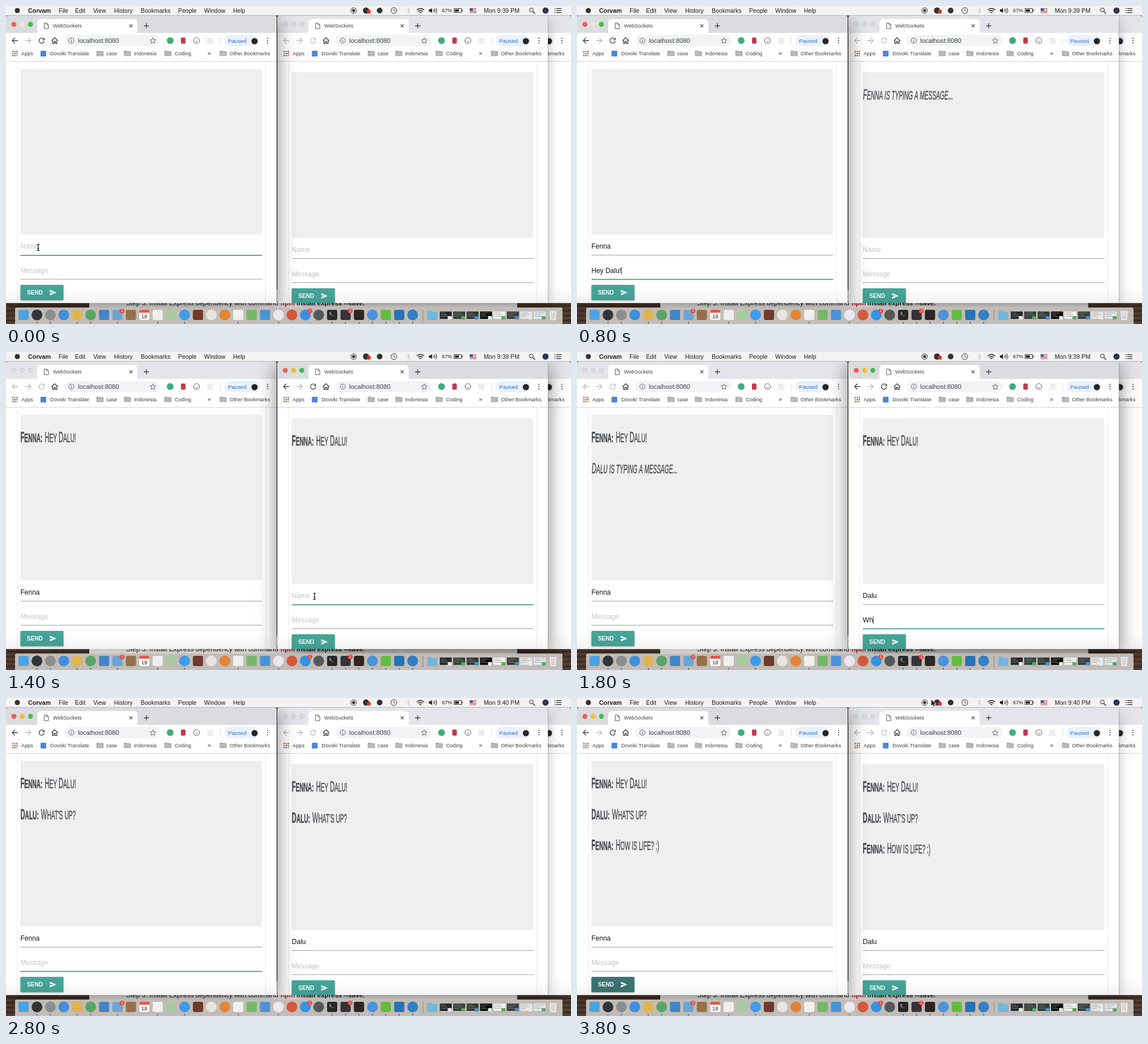
Write an HTML page with a canvas that moves like this. It is 998 px wide and 561 px high and loops after 4 s.

```html
<!DOCTYPE html>
<html lang="en">
<head>
<meta charset="utf-8">
<title>WebSockets chat</title>
<style>
html, body { margin: 0; width: 100%; height: 100%; overflow: hidden; background: #fff; }
canvas { display: block; }
</style>
</head>
<body>
<canvas id="stage" width="998" height="561"></canvas>
<script>
const ctx = document.getElementById('stage').getContext('2d');
const FONT = '"Liberation Sans", Arial, sans-serif';
const INK = '#3c4043', TEAL = '#45a598';
const STEP = 200, STEPS = 20;

const ICON = {
  back: 'M5 0H-5M0-5L-5 0L0 5',
  forward: 'M-5 0H5M0-5L5 0L0 5',
  reload: 'M3.4-3.2A4.6 4.6 0 1 0 4.6 1M4.6-5V-1.4H1',
  home: 'M-5.5 .3L0-5L5.5 .3M-3.8-1V5H-1.2V1.5H1.2V5H3.8V-1',
  star: 'M0-5L1.5-1.6L5-1.2L2.4 1.2L3.1 4.8L0 3L-3.1 4.8L-2.4 1.2L-5-1.2L-1.5-1.6Z',
  folder: 'M-5.5-4H-1L0-2.8H5.5V4.2H-5.5ZM-5.5-1H5.5',
  doc: 'M-3.5-5H1L4-2V5H-3.5ZM1-5V-2H4',
  close: 'M-2.6-2.6L2.6 2.6M2.6-2.6L-2.6 2.6',
  plus: 'M-4.5 0H4.5M0-4.5V4.5',
  send: 'M-5.5-5L6 0L-5.5 5V1.2L2 0L-5.5-1.2Z',
  arrow: 'M0 0V10.5L2.4 8.2L4 12L5.8 11.2L4.2 7.5H7.5Z',
  hand: 'M-2-6Q-.5-7.5 1-6V-1L5 0Q6 .5 6 2L5 6H-1L-5 1Q-4-.5-2 1Z',
  beam: 'M-2.5-5.5Q0-5.5 0-4V4Q0 5.5-2.5 5.5M2.5-5.5Q0-5.5 0-4M0 4Q0 5.5 2.5 5.5M-1.5 1.5H1.5'
};

// Chat script
const LOG = [['Fenna:', 'Hey Dalu!', 5], ['Dalu:', "What's up?", 12], ['Fenna:', 'How is life? :)', 18]];
const DRAFT = { 3: 'He', 4: 'Hey Dalu!', 9: 'Wh', 10: "What's", 11: "What's up?",
  15: 'How', 16: 'How is', 17: 'How is life? :)' };
const FOCUS = [[0, 'Lname'], [2, 'Lmsg'], [5, 'Lbtn'], [7, 'Rname'], [9, 'Rmsg'], [12, 'Rbtn'], [14, 'Lmsg'], [18, 'Lbtn']];
const POINTER = { 0: ['beam', 57, 426], 2: ['beam', 61, 463], 5: ['hand', 72, 508], 6: ['arrow', 537, 454],
  7: ['beam', 545, 431], 12: ['hand', 546, 513], 13: ['arrow', 94, 431], 18: ['hand', 72, 508], 19: ['arrow', 626, 3] };

function rect(x, y, w, h, color, r = 0) {
  ctx.fillStyle = color;
  ctx.beginPath();
  ctx.roundRect(x, y, w, h, r);
  ctx.fill();
}

function dot(x, y, r, color, ring) {
  ctx.beginPath();
  ctx.arc(x, y, r, 0, 7);
  if (color) { ctx.fillStyle = color; ctx.fill(); }
  if (ring) { ctx.strokeStyle = ring; ctx.lineWidth = 1; ctx.stroke(); }
}

function text(s, x, y, size, color = INK, style = '') {
  ctx.font = `${style} ${size}px ${FONT}`;
  ctx.fillStyle = color;
  ctx.fillText(s, x, y);
  return ctx.measureText(s).width;
}

function path(d, x, y, stroke, fill, width = 1.3) {
  const p = new Path2D(d);
  ctx.save();
  ctx.translate(x, y);
  if (stroke) { ctx.strokeStyle = stroke; ctx.lineWidth = width; ctx.stroke(p); }
  if (fill) { ctx.fillStyle = fill; ctx.fill(p); }
  ctx.restore();
}

function shadow(alpha, blur, dy) {
  ctx.shadowColor = `rgba(0,0,0,${alpha})`;
  ctx.shadowBlur = blur;
  ctx.shadowOffsetY = dy;
}

// Narrow hand-lettered capitals; returns the x where the text ends
function lettering(s, x, y, style) {
  const squeeze = 0.45;
  ctx.save();
  ctx.translate(x, y);
  ctx.scale(squeeze, 1);
  ctx.strokeStyle = '#474c4f';
  ctx.lineWidth = 0.5;
  let end = 0;
  for (const run of s.match(/[A-Z]|[^A-Z]+/g)) {
    const caps = run.toUpperCase();
    const w = text(caps, end, 0, /[A-Z]/.test(run) ? 25 : 22.5, '#474c4f', style);
    ctx.strokeText(caps, end, 0);
    end += w;
  }
  ctx.restore();
  return x + end * squeeze;
}

function toolbar(active) {
  const nav = active ? INK : '#b9bbbf';
  path(ICON.back, 16, 61, nav);
  path(ICON.forward, 39, 61, '#b9bbbf');
  path(ICON.reload, 63, 61, nav);
  path(ICON.home, 86, 61, INK);
  rect(103, 51, 169, 20, '#f1f3f4', 10);
  dot(115.5, 61, 4.6, null, '#5f6368');
  rect(115, 60, 1, 4, '#5f6368');
  rect(115, 58, 1, 1, '#5f6368');
  text('localhost:8080', 127, 64.5, 11.3);
  path(ICON.star, 259.5, 61, '#5f6368', null, 1);
  dot(290, 61, 6, '#3fae78');
  rect(309, 55.5, 8, 11, '#c23a50', 2);
  dot(336.5, 61, 5.2, null, '#55595d');
  path('M-2.2 1Q0 4 2.2 1', 336.5, 61, '#55595d', null, 1);
  rect(355, 56, 11, 11, '#eeeeef');
  rect(378, 55, 1, 12, '#dadce0');
  rect(386, 51, 61, 20, '#eaf1fd', 10);
  text('Paused', 392, 64.5, 9.7, '#2b6fc9');
  dot(439, 62, 5.5, '#292523');
  for (const y of [57, 61, 65]) dot(462, y, 1.1, INK);
}

function bookmarks() {
  const hues = ['#d9534a', '#e28a3c', '#4c8b5c'];
  for (let i = 0; i < 9; i++) rect(11 + i % 3 * 3.6, 79 + (i / 3 | 0) * 3.6, 2.4, 2.4, hues[(i + (i / 3 | 0)) % 3]);
  rect(61, 79, 10, 10, '#4a86dd', 1);
  for (const x of [166, 214.5, 286, 383.5]) path(ICON.folder, x, 83.5, '#62666a', '#b8bbbe', 1);
  const labels = [['Apps', 27], ['Dovoki Translate', 78], ['case', 177], ['Indonesia', 226], ['Coding', 298], ['Other Bookmarks', 395]];
  for (const [s, x] of labels) text(s, x, 87, 9.2);
  text('»', 356, 87, 11);
}

function field(label, value, y, focused, color, caret) {
  const w = text(value || label, 25.5, y, 12, value ? '#111' : '#c4c4c4');
  rect(25.5, y + 11, 427, focused ? 1.7 : 1, focused ? color : '#9b9ea0');
  if (caret) rect(25.5 + (value ? w : 0), y - 10, 1, 13, '#222');
}

function page(side, n, focus) {
  const left = side === 'L';
  rect(19.5, 98, 1, 426, '#e9e9e9');
  rect(458, 98, 1, 426, '#e9e9e9');
  ctx.translate(0, left ? 0 : 6);
  rect(25.5, 111, 426.5, 292, '#efefef');

  const sent = LOG.filter(m => n >= m[2]);
  const lineY = i => 159 + i * 54.7;
  sent.forEach(([who, words], i) => {
    const end = lettering(who, 25.5, lineY(i), 'bold');
    lettering(words, end + 4, lineY(i), '');
  });
  const draft = DRAFT[n];
  if (draft && focus[0] !== side)
    lettering(`${left ? 'Dalu' : 'Fenna'} is typing a message...`, 26, lineY(sent.length), 'italic');

  const onName = focus === side + 'name', onMsg = focus === side + 'msg';
  const name = n >= (left ? 1 : 8) ? (left ? 'Fenna' : 'Dalu') : '';
  const mine = onMsg && draft || '';
  field('Name', name, 428, onName, '#559a76', onName && name);
  field('Message', mine, 470.5, onMsg, n === 2 ? '#7d9693' : '#459a92', mine || onMsg && n === 2);

  ctx.save();
  shadow(0.3, 3, 1);
  rect(25.5, 492, 76, 27, focus === side + 'btn' ? '#3a7573' : TEAL, 1.5);
  ctx.restore();
  text('SEND', 37, 509, 10.1, '#fff', 'bold');
  path(ICON.send, 83, 505.5, null, '#fff');
}

function browser(dx, active, side, n, focus) {
  ctx.save();
  ctx.translate(dx, 0);
  ctx.save();
  shadow(active ? 0.5 : 0.25, active ? 34 : 22, 6);
  rect(0, 17, 478, 507, '#fff', [4, 4, 0, 0]);
  ctx.restore();
  rect(0, 17, 478, 30.5, active ? '#dadce0' : '#e4e5ea', [4, 4, 0, 0]);
  rect(55, 23, 177, 25, '#fff', [6, 6, 0, 0]);
  const lights = ['#ee5f57', n < 7 ? '#eee6cf' : '#f2bb3d', '#3fbf4b'];
  lights.forEach((c, i) => dot(14 + i * 14.6, 32.3, 4.4, active ? c : '#d9dade', active ? null : '#cfd0d5'));
  path(ICON.doc, 71, 35, '#55595d', null, 1);
  text('WebSockets', 83, 38, 9.1);
  path(ICON.close, 220.5, 35, INK, null, 1.2);
  path(ICON.plus, 248, 35, INK);
  toolbar(active);
  bookmarks();
  rect(0, 97, 478, 1, '#d3d5d8');
  if (side) {
    ctx.beginPath();
    ctx.rect(0, 98, 478, 426);
    ctx.clip();
    page(side, n, focus);
  }
  ctx.restore();
  rect(dx + 478, 19, 0.7, 505, 'rgba(0,0,0,.3)');
}

function menuBar(n) {
  rect(0, 0, 998, 16, '#f3f3f3');
  rect(0, 16, 998, 1, '#b7b7b9');
  dot(20, 8, 4.6, '#333');
  text('Corvam', 39, 11.7, 10.8, '#1c1c1c', 'bold');
  const items = [['File', 93], ['Edit', 122], ['View', 154], ['History', 191], ['Bookmarks', 238], ['People', 304], ['Window', 350], ['Help', 401]];
  for (const [s, x] of items) text(s, x, 11.7, 10.5, '#1c1c1c');
  dot(614, 8, 5, null, '#333');
  rect(611.5, 5.5, 5, 5, '#333', 1);
  dot(636, 8, 5.5, '#333');
  dot(641, 10, 3.5, '#d8372c');
  dot(660, 8, 5, '#333');
  dot(685, 8, 5.2, null, '#333');
  path('M0-3V0L2.5 1.5', 685, 8, '#333', null, 1);
  path('M-2.5-2.5L2.5 2.5L0 5V-5L2.5-2.5L-2.5 2.5', 711, 8, '#c9c9c9', null, 1);
  path('M-6.5-1.5Q0-7 6.5-1.5M-4 1Q0-2.5 4 1M-1.5 3.5Q0 2 1.5 3.5', 732, 8.5, '#222', null, 1.6);
  path('M-7-2H-4.5L-1.5-4.5V4.5L-4.5 2H-7Z', 754, 8, null, '#222');
  path('M1-2Q2.5 0 1 2M3-3.5Q5.5 0 3 3.5M5-5Q9 0 5 5', 754, 8, '#222', null, 1);
  text('67%', 770, 11.4, 9, '#1c1c1c');
  ctx.strokeStyle = '#333';
  ctx.lineWidth = 1;
  ctx.strokeRect(791.5, 4.5, 13, 7);
  rect(793, 6, 7, 4, '#222');
  rect(805.5, 6.5, 1.5, 3, '#333');
  for (let i = 0; i < 7; i++) rect(819, 4 + i * 1.2, 12, 1.2, i % 2 ? '#eee' : '#bd5960');
  rect(819, 4, 5.5, 4.6, '#4a5583');
  text(`Mon 9:${n < 14 ? 39 : 40} PM`, 844, 11.7, 10.6, '#1c1c1c');
  dot(928, 7, 3.4, null, '#222');
  path('M0 0L4 4', 930.5, 9.5, '#222');
  dot(953, 8, 5.5, '#34355c');
  for (const y of [4, 7.5, 11]) {
    rect(969, y, 1.5, 1.2, '#222');
    rect(972, y, 9, 1.2, '#222');
  }
}

function desktop() {
  rect(0, 0, 998, 561, '#4b382c');
  for (let i = 0; i < 9; i++) rect(0, 524 + i * 4.3, 998, 1.3, i % 2 ? '#33251d' : '#60493a');
  rect(147, 500, 756, 32, '#f0eeed');
  text('Step 3: Install Express dependency with command', 212, 527.5, 12, '#222');
  rect(483, 518, 27, 12, '#f6dfdf');
  text('npm', 485, 527.5, 12, '#b33', 'bold');
  text('install express --save.', 513, 527.5, 11.6, '#222', 'bold');
}

// Circles are marked o, squares s
const APPS = ('s#4ba3e3 o#30353b o#8b8d90 o#3f8fdc o#dfb44a o#59a568 s#4285c8 s#6aa5d6 s#95714a s#f5f5f5 ' +
  's#efefee s#a7cba1 o#3f9cec s#6d3a2c o#e8e4df o#e48435 s#f0f0ee s#75b86a s#4a92d6 o#ebe7f1 ' +
  'o#d4573e o#3292e8 o#55585b s#252729 s#35323a s#2c2524 o#4a93dd s#63bd3f s#2673b7 o#317fc6').split(' ');
const THUMBS = ['#25272b', '#34403b', '#2e3c35', '#0b0b0c', '#f0f0ee', '#3b3b3d', '#e6e6e5', '#dfe7ee'];

function badge(x, label) {
  dot(x, 538, 4.3, '#e5473c');
  ctx.textAlign = 'center';
  text(label, x, 540.3, 6.5, '#fff');
  ctx.textAlign = 'left';
}

function dock() {
  rect(16, 532, 967, 34, 'rgba(209,203,198,.9)', 3);
  APPS.forEach((app, i) => {
    const x = 31 + i * 23.7, color = app.slice(1);
    if (app[0] === 'o') dot(x, 545, 9.5, color);
    else rect(x - 9, 536, 18, 18, color, 3);
    if ('011011010010100010010001111111'[i] === '1') dot(x, 558.8, 1, '#333');
  });
  rect(235.3, 536, 18, 5, '#e0574c', [3, 3, 0, 0]);
  text('18', 239, 551, 9.5, '#333');
  text('$_', 571, 545, 7, '#ddd');
  badge(205, '3');
  badge(536.5, '1');
  badge(608, '1');
  rect(736, 536, 1, 20, '#8f8983');
  path('M-9-8H-2L0-6H9V8H-9Z', 753, 546, null, '#71b7df');
  THUMBS.forEach((c, i) => {
    const x = 766.3 + i * 23.7;
    rect(x, 539, 21, 13, c);
    for (let k = 0; k < 3; k++) rect(x + 2, 541 + k * 3, 8 + (i * 5 + k * 3) % 9, 1, i < 4 || i === 5 ? '#6b7672' : '#a9aaad');
    rect(x + 14, 547, 7, 6, ['#e9e9ea', '#5ca568', '#4a91d0'][i % 3], 1.5);
  });
  path('M-6.5-8H6.5L5 9H-5Z', 966.5, 545.5, '#a9a9a9', '#ececeb', 1);
  path('M-3-6L-2 7M0-6V7M3-6L2 7M-7-8H7', 966.5, 545.5, '#b8b8b8', null, 1);
}

function draw(n) {
  const focus = FOCUS.filter(f => f[0] <= n).pop()[1];
  const leftActive = n < 7 || n > 13;
  const left = () => browser(0, leftActive, 'L', n, focus);
  const right = () => browser(479.3, !leftActive, 'R', n, focus);
  desktop();
  browser(520, false, '', n, focus);
  if (leftActive) { right(); left(); } else { left(); right(); }

  const fade = ctx.createLinearGradient(0, 497, 0, 524);
  fade.addColorStop(0, 'rgba(0,0,0,0)');
  fade.addColorStop(1, 'rgba(0,0,0,.05)');
  rect(0, 497, 998, 27, fade);
  dock();
  menuBar(n);

  if (POINTER[n]) {
    const [kind, x, y] = POINTER[n];
    const beam = kind === 'beam';
    path(ICON[kind], x, y, beam ? '#111' : '#fff', beam ? null : '#111', beam ? 1.2 : 1.6);
  }
}

function tick() {
  draw(Math.floor(performance.now() / STEP) % STEPS);
  requestAnimationFrame(tick);
}
tick();
</script>
</body>
</html>
```
